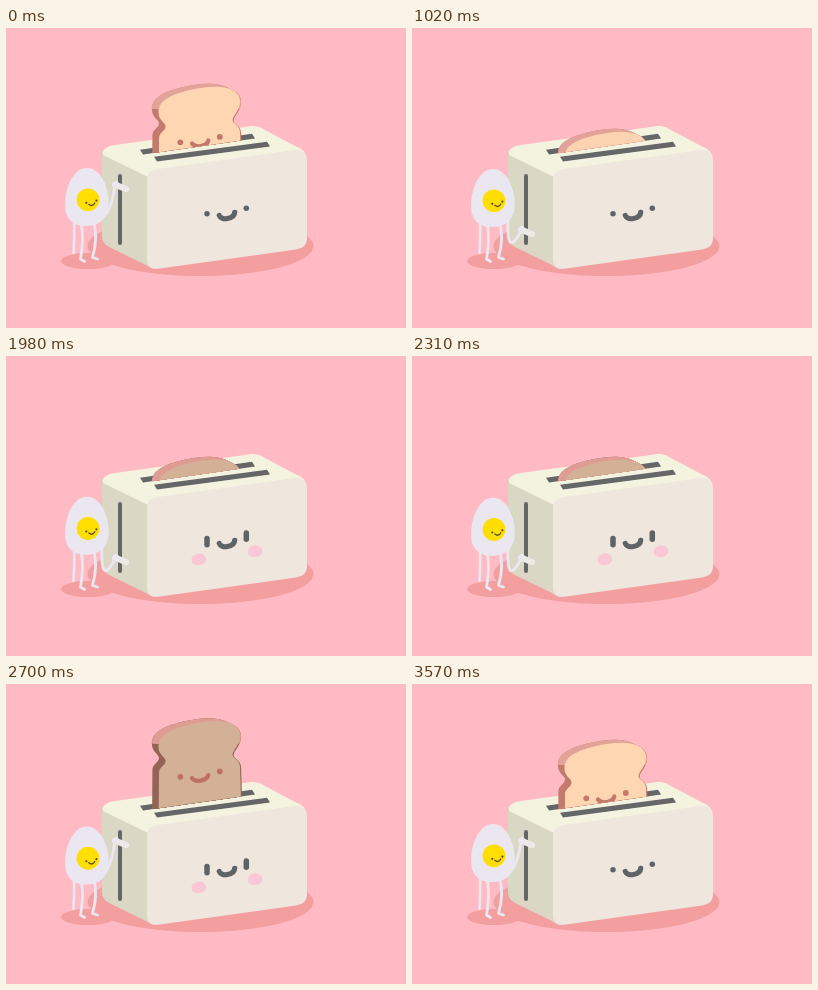
Recreate the animation shown at these times as an HTML page with a canvas. Size 400 px wide and 300 px high, loop 3600 ms.

```html
<!DOCTYPE html>
<html>
<head>
<meta charset="utf-8">
<title>Toaster and egg</title>
<style>
html, body { margin: 0; width: 100%; height: 100%; overflow: hidden; background: #ffbac3; }
canvas { display: block; width: 400px; height: 300px; }
</style>
</head>
<body>
<canvas id="stage" width="400" height="300"></canvas>
<script>
const ctx = document.getElementById('stage').getContext('2d');
const LOOP = 3600;

const clamp = u => Math.max(0, Math.min(1, u));
const ramp = (t, a, b) => clamp((t - a) / (b - a));
const smooth = u => (1 - Math.cos(Math.PI * u)) / 2;
const easeOut = u => 1 - (1 - u) ** 3;
const mix = (a, b, u) => a + (b - a) * u;
const blend = (a, b, u) => `rgb(${a.map((v, i) => Math.round(mix(v, b[i], u)))})`;

// keys: [time, value, easing into this key]
function track(keys, t) {
  for (let i = 1; i < keys.length; i++) {
    const [t0, v0] = keys[i - 1], [t1, v1, ease = smooth] = keys[i];
    if (t <= t1) return mix(v0, v1, ease(ramp(t, t0, t1)));
  }
  return keys[keys.length - 1][1];
}

const breadKeys = [[0, 0], [30, 0], [330, 45], [2340, 45], [2570, -38, easeOut],
  [2860, 1], [2970, -1], [3120, 0]];
const leverKeys = [[0, 0], [30, 0], [330, 1], [2340, 1], [2430, 0, easeOut]];
const toastKeys = [[0, 0], [900, 0], [1600, 1], [2760, 1], [3240, 0]];
const eyeKeys = [[0, 0], [1400, 0], [1600, 1], [3210, 1], [3330, 0]];
const cheekKeys = [[0, 0], [1680, 0], [1960, 1], [3450, 1], [3570, 0]];
const bobKeys = [[0, 0], [360, 0.6], [700, 1.6], [1020, 1], [1400, 1.6], [1800, 0],
  [1980, 0.7], [2460, 2], [2970, 3], [3340, 0]];

const DARK = '#646668';
const WHITE = '#ebe7f1';

function fill(path, color) {
  ctx.fillStyle = color;
  ctx.fill(typeof path === 'string' ? new Path2D(path) : path);
}

function line(path, color, width) {
  ctx.strokeStyle = color;
  ctx.lineWidth = width;
  ctx.lineCap = ctx.lineJoin = 'round';
  ctx.stroke(new Path2D(path));
}

function oval(x, y, rx, ry, color, turn = 0) {
  ctx.fillStyle = color;
  ctx.beginPath();
  ctx.ellipse(x, y, rx, ry, turn, 0, Math.PI * 2);
  ctx.fill();
}

const slice = new Path2D('M152.5 190 L153 110 C153.500 104 160 103 159.500 98 C159 94 153 93 152.500 85 ' +
  'C152 74 162 67 184 62 C205 57 233 56 234 73 C234 83 227 87 226.500 92 ' +
  'C226.500 96 233 96 234 104 L236.500 190 Z');

// the slice pushed back step by step gives it thickness
function crust(color) {
  for (let i = 6; i >= -1; i--) {
    ctx.save();
    ctx.translate(-1.1 * i, -0.5 * i);
    fill(slice, color);
    ctx.restore();
  }
}

function bread(dy, toast) {
  ctx.save();
  // everything below the slot's front edge is hidden
  ctx.clip(new Path2D('M100 0 H300 V103.2 L100 131.8 Z'));
  ctx.translate(0, dy);
  crust(blend([196, 122, 108], [146, 101, 86], toast));
  ctx.save();
  ctx.beginPath();
  ctx.rect(130, 40, 120, 41);
  ctx.clip();
  crust(blend([226, 163, 153], [222, 156, 147], toast));
  ctx.restore();
  fill(slice, blend([255, 214, 178], [211, 177, 150], toast));
  const face = blend([196, 120, 106], [192, 112, 96], toast);
  oval(174.3, 114.3, 2.9, 2.9, face);
  oval(213.8, 108.9, 2.9, 2.9, face);
  line('M186 115.5 C189 120 201 118.700 202.300 112.500', face, 4.2);
  ctx.restore();
}

function shadows() {
  oval(194.5, 218, 113, 30, '#f39f9f');
  oval(82, 233, 27, 8, '#f39f9f');
}

function toasterBody() {
  fill('M97 121 L142 144 L149 241 C146 241 143 239 140 237 L103 219 C98 216 96 213 96 207 ' +
    'L96 127 Q96 123 97 121 Z', '#dbd7c5');
  fill('M97 127 C96 121 101 118 109 117 L242 98.5 C249 97.500 252 98 257 101 L291 119 ' +
    'C296 121 299 123 300 128 L290 135 L155 152 L142 149 Z', '#f4f3df');
  fill('M141 152 C141 145 145 142 152 141 L288 122 C297 121 301 125 301 133 L301 209 ' +
    'C301 217 298 220 290 221.500 L154 240.500 C146 242 141 239 141 231 Z', '#efe6dd');
  fill('M134 121.700 L246 105.700 L249 110.500 L137 126.500 Z', DARK);
}

function toasterFace(wide, cheeks) {
  const ink = '#606365';
  const reach = wide * 3.1;
  for (const [x, y] of [[201, 185.700], [240.300, 180.200]]) {
    line(`M${x} ${y - reach} V${y + reach + 0.01}`, ink, 5.5);
  }
  line('M213.300 187.500 C215 192.600 228 191.600 228.700 184.300', ink, 5.2);
  ctx.globalAlpha = cheeks;
  oval(192.800, 203.300, 7.400, 5.900, '#fac8d5', -0.15);
  oval(249, 195.300, 7.400, 5.900, '#fac8d5', -0.15);
  ctx.globalAlpha = 1;
}

function egg(bob, press) {
  const hip = 190 + bob;
  line(`M68 ${hip} Q68.500 210 67.500 225`, WHITE, 2.6);
  line(`M75 ${hip} C77 208 77 216 74.500 231 L78.500 233.500`, WHITE, 2.8);
  line(`M87 ${hip} C91 207 90 217 86.500 229.500 L91.500 231`, WHITE, 2.8);

  const hy = mix(158, 203, press);
  line(`M96 ${188 + bob} Q${mix(104, 94, press)} ${mix(188, 232, press)} 109 ${hy}`, WHITE, 2.8);

  ctx.save();
  ctx.translate(0, bob);
  fill('M81 140 C94.500 140 102.700 159 102.700 175 C102.700 190 94 197.500 81 198 ' +
    'C67 198.500 59 191 59 177 C59 158 68 140 81 140 Z', WHITE);
  oval(82, 171.8, 11.4, 11.4, '#ffde00');
  const ink = '#524e28';
  oval(80.3, 174.8, 1.1, 1.1, ink);
  oval(90.4, 172.6, 1.1, 1.1, ink);
  line('M82.800 176.300 Q86.500 179.300 88.700 175', ink, 1.3);
  ctx.restore();
}

function lever(press) {
  ctx.save();
  ctx.translate(0.6, press * 45 + 0.6);
  line('M108.500 156 L119.500 160.500', '#eee8e6', 6);
  line('M108 157 L109.500 155', WHITE, 5);
  ctx.restore();
}

function draw(t) {
  const press = track(leverKeys, t);
  ctx.fillStyle = '#ffbac3';
  ctx.fillRect(0, 0, 400, 300);
  shadows();
  toasterBody();
  bread(track(breadKeys, t), track(toastKeys, t));
  fill('M148 128.700 L261 113.700 L264 118.500 L151 133.500 Z', DARK);
  line('M114 148 V215', DARK, 4);
  toasterFace(track(eyeKeys, t), track(cheekKeys, t));
  egg(track(bobKeys, t), press);
  lever(press);
}

const start = performance.now();
function frame() {
  draw((performance.now() - start) % LOOP);
  requestAnimationFrame(frame);
}
frame();
</script>
</body>
</html>
```
